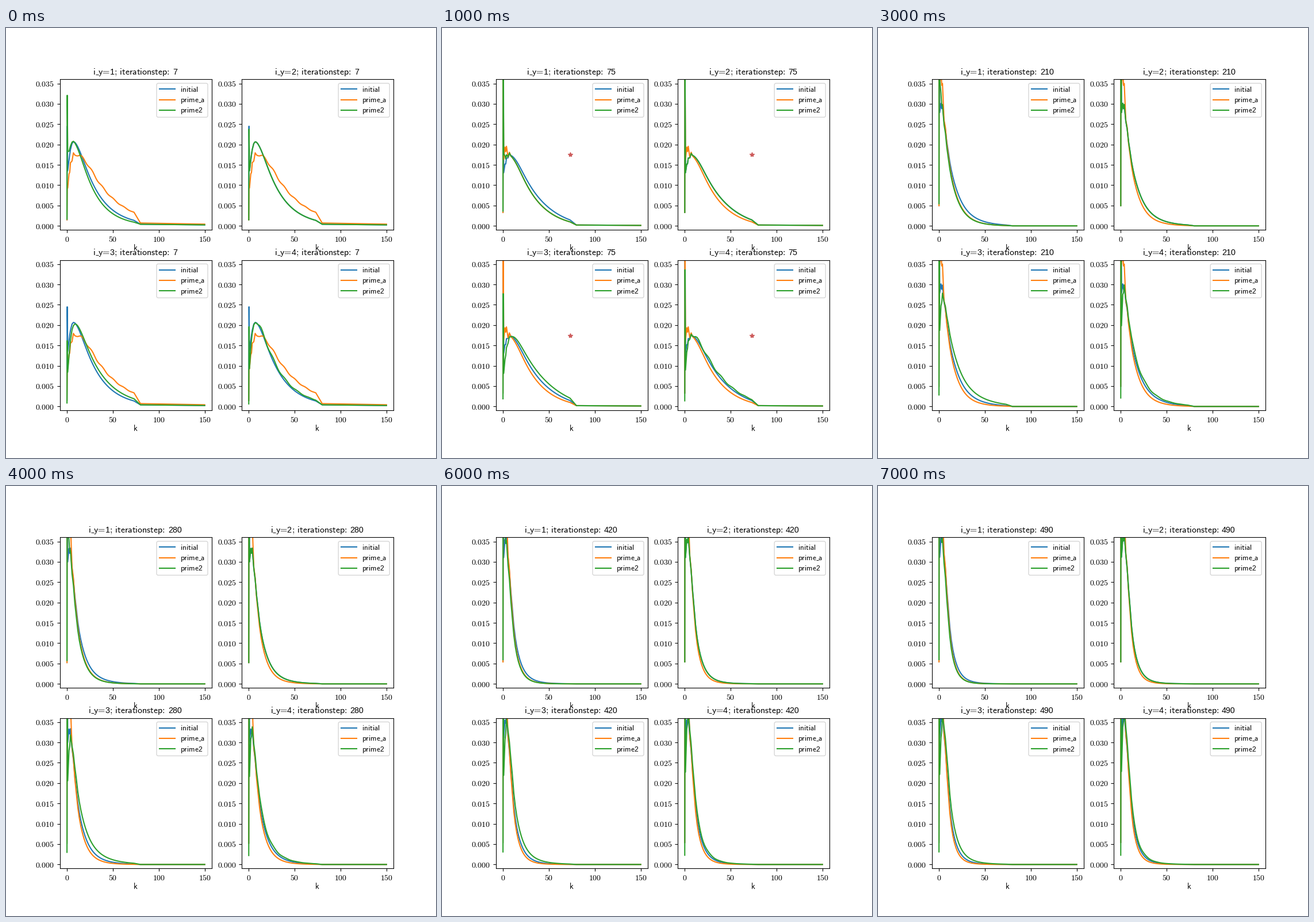
A matplotlib script for the animation above (8 s loop, 748 by 748 pixels).

```python
import numpy as np
import matplotlib.pyplot as plt
from matplotlib.animation import FuncAnimation
from matplotlib.patches import FancyBboxPatch

plt.rcParams["mathtext.fontset"] = "cm"

SIZE, DPI = 748, 100
BLUE, ORANGE, GREEN = "#1f77b4", "#ff7f0e", "#2ca02c"
STEPS = [7, 75, 140, 210, 280, 350, 420, 490]
RESET = 75  # the spectrum is disturbed here and relaxes afterwards

# Samples along k: a spike near zero, a jagged start, a smooth tail, a flat end.
HEAD = np.array([.8, 2.2, 3, 3.8, 5.5, 7])
BODY = np.concatenate([HEAD, np.linspace(8.5, 73, 40)])
K = np.concatenate([[0, .25], BODY, [80, 150]])
ZIGZAG = np.where(BODY <= 7, -(-1.0) ** np.arange(len(BODY)), 0)

# Second spectrum against the initial one, all logarithmic but the spike:
# step near zero, its reach in k, late offset, tilt, (start, peak) factors.
PRIME2 = {
    1: (.5, 1.6, -.1, -1, (1.1, 1.31)),
    2: (0, 1, 0, 0, (1, .97)),
    3: (-.65, 2.5, .15, .85, (.57, .66)),
    4: (-.7, 1.3, .08, .4, (.42, .8)),
}


def hump(top, slope, onset, dip):
    """Plateau that rises from a dip and bends into an exponential fall."""
    fall = slope * 4 * np.log1p(np.exp((BODY - onset) / 4))
    return top * np.exp(-fall) * (1 - dip * np.exp(-(BODY / 3.5) ** 1.6))


def ripple(size, period, crest):
    fade = np.clip((BODY - 7) / 4, 0, 1)
    return size * fade * np.cos(2 * np.pi * (BODY - crest) / period)


def relaxed(t):
    """Initial spectrum at time t after the reset: low k grows, high k decays."""
    base = hump(181, .0365, 13.3, .28) * (1 - (BODY / 100) ** 4)
    gain = .87 / (1 + (BODY / 7.5) ** 4) * (1 - np.exp(-t / (55 + 14 * BODY)))
    rate = .0145 * (1 - np.exp(-np.maximum(BODY - 9.5, 0) / 48))
    span = 690 * (1 - np.exp(-t / 450))
    return base * np.exp(gain - rate * span + .025 * ZIGZAG)


def full(body, spike, end):
    return 1e-4 * np.concatenate([spike, body, [end, .6 * end]])


def spectra(step, panel):
    """Values on K of the three lines of one panel."""
    t = max(step - RESET, 0)
    late = 1 - np.exp(-t / 200)
    tilt = (.006 + .018 * late) * np.maximum(BODY - 7, 0)
    if step < RESET:
        base, spike, end = hump(222, .0455, 11.5, .42), np.array([15, 245]), 4
        wave = .04 * ZIGZAG + ripple(.02, 11.5, 16)
        prime_a = full(hump(178, .031, 18.5, .5) * np.exp(wave), [15, 92], 7)
    else:
        base = relaxed(t)
        grow = 1 - np.exp(-t / 80)
        spike = np.array([33, 420]) * np.exp(.5 * grow)
        end = 2 * np.exp(-t / 40)
        lift = .24 * np.exp(-(BODY / 4.5) ** 4)
        prime_a = full(base * np.exp(lift - tilt + .015 * ZIGZAG), spike, end)

    jump, reach, offset, lean, factors = PRIME2[panel]
    ratio = jump * np.exp(-BODY / reach) + offset * late + lean * tilt
    if panel == 4:
        ratio = ratio + ripple(.025, 13, 14)
    prime2 = full(base * np.exp(ratio), spike * factors, end)
    return full(base, spike, end), prime_a, prime2


fig, grid = plt.subplots(2, 2, figsize=(SIZE / DPI, SIZE / DPI), dpi=DPI)
fig.patch.set_facecolor("white")
fig.subplots_adjust(left=94.1 / SIZE, right=673.8 / SIZE,
                    top=1 - 89.46 / SIZE, bottom=1 - 665.42 / SIZE)

# Sheet in pixel coordinates for titles, labels and legends.
sheet = fig.add_axes([0, 0, 1, 1], zorder=5)
sheet.set_xlim(0, SIZE)
sheet.set_ylim(SIZE, 0)
sheet.axis("off")

TITLE_PT, LEGEND_PT = 11.4, 9.6
GAP = r"\hspace{0.41}"  # room for an underscore
NAMES = [("initial", BLUE), ("prime" + GAP + "a", ORANGE), ("prime", GREEN)]


def em(points):
    return points * DPI / 72


def sans(x, y, text, points, **style):
    return sheet.text(x, y, r"$\mathsf{" + text + "}$", fontsize=points,
                      va="baseline", **style)


def digits(x, y, text, points):
    return sheet.text(x, y, text, fontsize=.9 * points, va="baseline",
                      family="Liberation Sans")


def underscore(x, y, points):
    return sheet.plot([x, x + .3 * em(points)], [y - .5] * 2, color="black",
                      lw=.65, solid_capstyle="butt")[0]


def legend(dx, dy):
    sheet.add_patch(FancyBboxPatch(
        (262 + dx, 96.2 + dy), 89, 59, boxstyle="round,pad=0,rounding_size=2.8",
        fc="white", ec="0.8", lw=1, alpha=.8))
    x, unit = 303 + dx, em(LEGEND_PT)
    for i, (name, color) in enumerate(NAMES):
        y = 106.3 + 18.3 * i + dy
        sheet.plot([267.3 + dx, 294.3 + dx], [y, y], color=color, lw=1.5)
        sans(x, y + 4.5, name, LEGEND_PT)
        if color == ORANGE:
            underscore(x + 2.396 * unit, y + 4.5, LEGEND_PT)
        if color == GREEN:
            digits(x + 2.336 * unit, y + 4.5, "2", LEGEND_PT)


class Title:
    """Line of text in pieces, centred again whenever the step changes."""

    def __init__(self, mid, y, number):
        self.mid = mid
        word = r";\hspace{0.18}iterationstep\hspace{-0.2}:"
        self.step = digits(0, y, "", TITLE_PT)
        # Pieces with their distance from the left edge in em.
        self.pieces = [
            (sans(0, y, "i" + GAP + r"y\hspace{-0.2}=", TITLE_PT), 0),
            (digits(0, y, str(number), TITLE_PT), 1.838),
            (sans(0, y, word, TITLE_PT), 2.338),
            (self.step, 8.749),
        ]
        self.rule = underscore(0, y, TITLE_PT)

    def show(self, step):
        unit = em(TITLE_PT)
        left = self.mid - (8.749 + .5 * len(str(step))) * unit / 2
        self.step.set_text(str(step))
        for piece, shift in self.pieces:
            piece.set_x(left + shift * unit)
        self.rule.set_xdata([left + .299 * unit, left + .599 * unit])


class Panel:
    def __init__(self, number, ax):
        self.number = number
        row, col = divmod(number - 1, 2)
        dx, dy = 316.2 * col, 314.2 * row
        ax.set_xlim(-7.5, 157.5)
        ax.set_ylim(-.001, .036)
        ax.set_xticks([0, 50, 100, 150], ["$%d$" % v for v in (0, 50, 100, 150)])
        ticks = np.arange(8) * .005
        ax.set_yticks(ticks, ["$%.3f$" % v for v in ticks])
        self.lines = [ax.plot([], [], color=c, lw=1.5)[0] for _, c in NAMES]
        self.star, = ax.plot([73], [.0175], "*", color="indianred", ms=6)
        self.title = Title(224.5 + dx, 81 + dy, number)
        sans(225 + dx, 387 + dy, "k", 10, ha="center")
        legend(dx, dy)

    def show(self, step):
        for line, values in zip(self.lines, spectra(step, self.number)):
            line.set_data(K, values)
        self.star.set_visible(step == RESET)
        self.title.show(step)


panels = [Panel(n, ax) for n, ax in enumerate(grid.flat, 1)]


def draw(i):
    for panel in panels:
        panel.show(STEPS[i])
    return []


anim = FuncAnimation(fig, draw, frames=len(STEPS), init_func=lambda: draw(0),
                     interval=1000, repeat=True, repeat_delay=0, blit=False)
plt.show()
```
